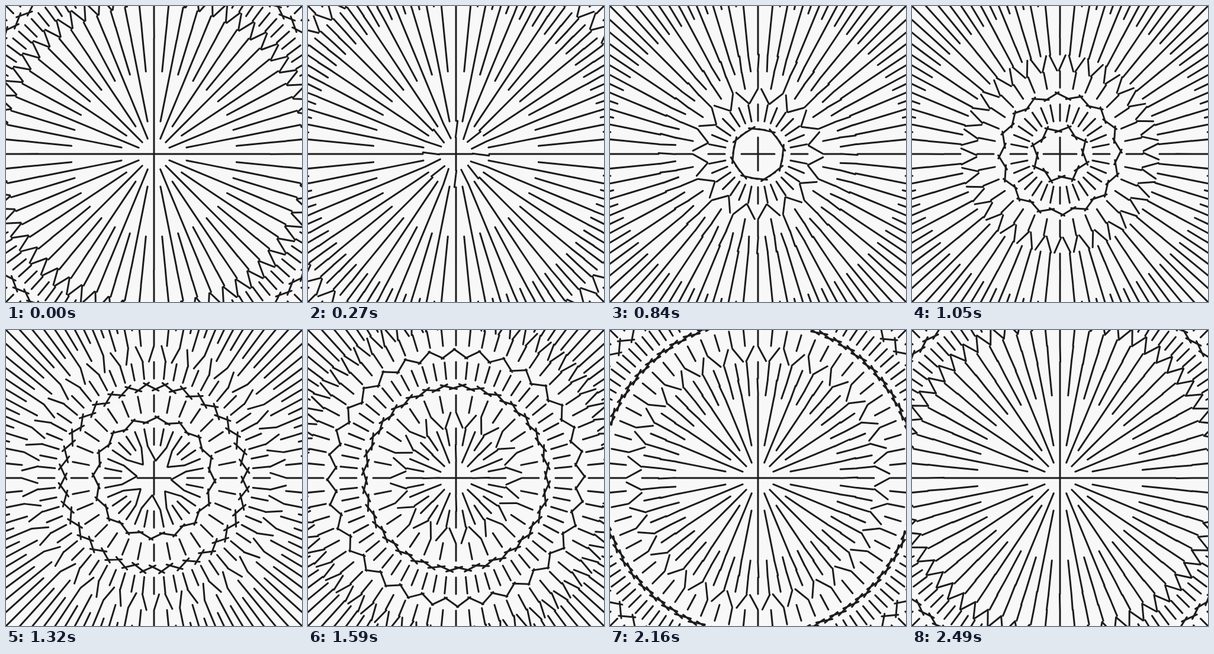
Animation of 500 by 500 pixels, one loop 2.52 s. Source, as an HTML page with a canvas:

```html
<!DOCTYPE html>
<html lang="en">
<head>
<meta charset="utf-8">
<title>Turning sticks</title>
<style>
  html, body { margin: 0; width: 100%; height: 100%; overflow: hidden; background: #f8f8f8; }
  canvas { display: block; }
</style>
</head>
<body>
<canvas id="stage" width="500" height="500"></canvas>
<script>
const ctx = document.getElementById('stage').getContext('2d');

const PERIOD = 2520;
const STEP = 30;
const STICK = 28;
const RINGS = 13;
const FIRST_START = 107;
const RING_DELAY = 300;
const TURN_TIME = 1560;

const ease = x => x * x * (3 - 2 * x);

function stickCount(ring) {
  if (ring === 0) return 4;
  return 16 << ((ring > 1) + (ring > 4) + (ring > 8));
}

// Only odd rings move; each starts a little after the one inside it.
function turnProgress(ring, time) {
  if (ring % 2 === 0) return 0;
  const start = FIRST_START + RING_DELAY * (ring - 1) / 2;
  const elapsed = (time - start + PERIOD) % PERIOD;
  return ease(Math.min(elapsed / TURN_TIME, 1));
}

function addRing(ring, time) {
  const count = stickCount(ring);
  const radius = (ring + 0.5) * STICK;
  const progress = turnProgress(ring, time);
  const direction = ring % 4 === 1 ? 1 : -1;

  for (let i = 0; i < count; i++) {
    // The ring moves on by two places while neighbours flip opposite ways.
    const angle = (i + direction * 2 * progress) * 2 * Math.PI / count;
    const tilt = angle + (i % 2 ? -1 : 1) * Math.PI * progress;
    const x = radius * Math.cos(angle);
    const y = radius * Math.sin(angle);
    const dx = STICK / 2 * Math.cos(tilt);
    const dy = STICK / 2 * Math.sin(tilt);
    ctx.moveTo(x - dx, y - dy);
    ctx.lineTo(x + dx, y + dy);
  }
}

function draw(time) {
  ctx.setTransform(1, 0, 0, 1, 0, 0);
  ctx.fillStyle = '#f8f8f8';
  ctx.fillRect(0, 0, 500, 500);
  ctx.translate(250, 250);
  ctx.strokeStyle = '#1c1c1e';
  ctx.lineWidth = 3;
  ctx.lineCap = 'round';
  ctx.beginPath();
  for (let ring = 0; ring < RINGS; ring++) addRing(ring, time);
  ctx.stroke();
}

function tick() {
  const time = performance.now() % PERIOD;
  draw(Math.floor(time / STEP) * STEP);
  requestAnimationFrame(tick);
}
tick();
</script>
</body>
</html>
```
